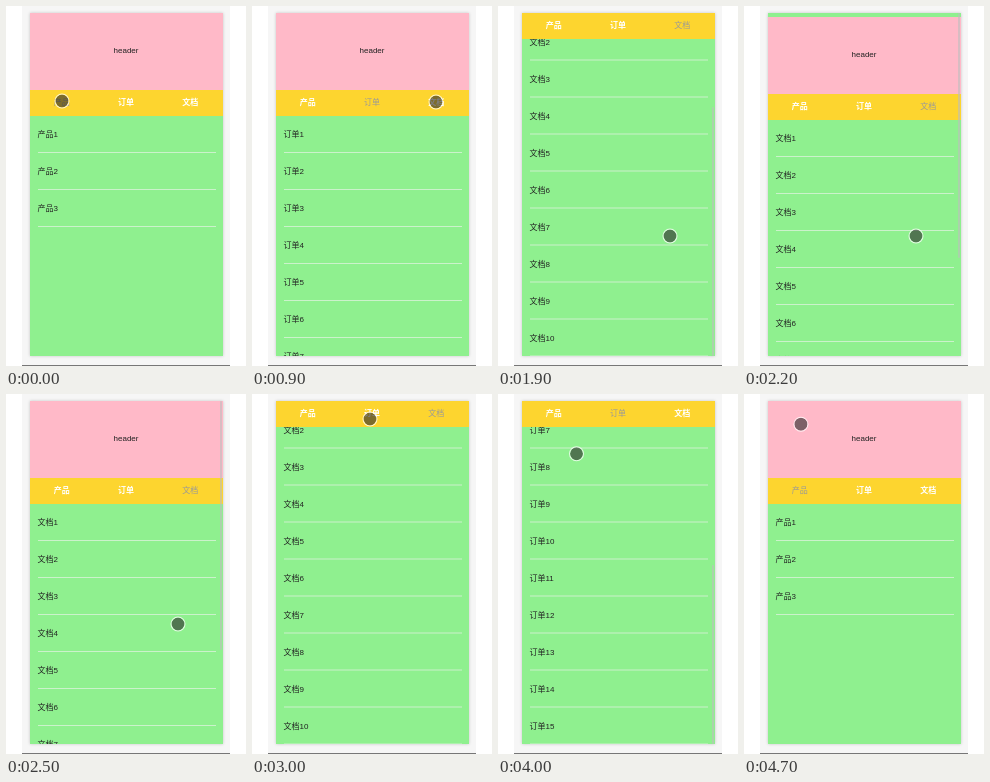
Write an HTML page that moves like this. It is 240 px wide and 360 px high and loops after 4.8 s.

```html
<!DOCTYPE html>
<html lang="zh-CN">
<head>
<meta charset="utf-8">
<style>
html, body { margin: 0; width: 100%; height: 100%; overflow: hidden; background: #fff; }
body { position: relative; font: 8px/1 "Liberation Sans", "Noto Sans CJK SC", "Noto Sans CJK", sans-serif; color: #222; }
div { position: absolute; box-sizing: border-box; }
#desk { left: 16px; top: 0; width: 208px; height: 360px; background: #f6f6f6; border-bottom: 1px solid #777; }
#phone, #shade { left: 23.5px; top: 7px; width: 193px; height: 343px; }
#phone { background: #8ff08f; overflow: hidden; }
#shade { box-shadow: 0 0 3px rgba(0,0,0,.2); }
#page, #head, #tabs { left: 0; top: 0; width: 100%; }
#head { height: 77px; line-height: 76px; background: #ffb9c8; text-align: center; }
#list { top: 102.5px; left: 8px; width: 178px; }
#list div { position: static; height: 37px; line-height: 37px; border-bottom: 1px solid #cbf2cb; }
#tabs { height: 25.5px; background: #fdd52f; display: flex; }
#tabs span { flex: 1; text-align: center; line-height: 26px; color: #fff; font-weight: 600; }
#tabs .on { color: #999; font-weight: 400; }
#bar { right: 1px; top: 0; width: 2px; border-radius: 1px; background: rgba(190,190,190,.6); }
#dot { left: 0; top: 0; width: 15px; height: 15px; border-radius: 50%; background: rgba(45,45,45,.62); background-clip: padding-box; border: 1px solid rgba(255,255,255,.75); }
</style>
</head>
<body>
<div id="desk"></div>
<div id="shade"></div>
<div id="phone">
  <div id="page"><div id="head">header</div><div id="list"></div></div>
  <div id="tabs"></div>
  <div id="bar"></div>
</div>
<div id="dot"></div>
<script>
const LOOP = 4800, STEP = 100, GLIDE = 300, PRESS = 100;
const VIEW = 343, HEAD = 77, TAB = 25.5, ROW = 37;
const names = ['产品', '订单', '文档'], counts = [3, 15, 10];
const el = id => document.getElementById(id);

// places the pointer reaches; those with a tab select it after a short press
const home = { x: 56, y: 95 };
const stops = [
  { at: 300, x: 120, y: 96, tab: 1 },
  { at: 900, x: 184, y: 96, tab: 2 },
  { at: 1500, x: 172, y: 230 },
  { at: 3000, x: 118, y: 25, tab: 1 },
  { at: 3500, x: 140, y: 159 },
  { at: 4100, x: 57, y: 25, tab: 0 },
  { at: 4950, ...home },
];

function ramp(t, from, to) {
  const p = Math.min(1, Math.max(0, (t - from) / (to - from)));
  return p * p * (3 - 2 * p);
}

function pointer(t) {
  return stops.reduce((p, s) => {
    const k = ramp(t, s.at - GLIDE, s.at);
    return { x: p.x + (s.x - p.x) * k, y: p.y + (s.y - p.y) * k };
  }, home);
}

function selected(t) {
  return stops.reduce((tab, s) => s.tab >= 0 && t >= s.at + PRESS ? s.tab : tab, 0);
}

function scroll(t, tab, max) {
  if (tab === 1) return max * ramp(t, 3600, 3900);
  if (tab === 0) return 0;
  const bounce = 4 * (ramp(t, 2100, 2200) - ramp(t, 2200, 2400));
  return max * (ramp(t, 1700, 1900) - ramp(t, 2000, 2200) + ramp(t, 2500, 2800)) - bounce;
}

el('tabs').innerHTML = names.map(n => `<span>${n}</span>`).join('');
let shown = -1;

function select(tab) {
  if (tab === shown) return;
  shown = tab;
  [...el('tabs').children].forEach((s, i) => s.classList.toggle('on', i === tab));
  el('list').innerHTML = Array.from({ length: counts[tab] },
    (_, i) => `<div>${names[tab]}${i + 1}</div>`).join('');
}

function draw(t) {
  const tab = selected(t), total = HEAD + TAB + counts[tab] * ROW;
  const y = scroll(t, tab, total - VIEW), { x: cx, y: cy } = pointer(t);
  select(tab);
  el('page').style.transform = `translateY(${-y}px)`;
  el('tabs').style.transform = `translateY(${Math.max(0, HEAD - y)}px)`;
  el('dot').style.transform = `translate(${cx - 7.5}px, ${cy - 7.5}px)`;

  const scrolling = t >= 1700 && t < 2900 || t >= 3600 && t < 4200;
  el('bar').style.opacity = scrolling ? 1 : 0;
  el('bar').style.height = VIEW * VIEW / total + Math.min(0, y) + 'px';
  el('bar').style.transform = `translateY(${Math.max(0, y) * VIEW / total}px)`;
}

const start = performance.now();
function tick() {
  const t = (performance.now() - start) % LOOP;
  draw(Math.floor(t / STEP) * STEP);
  requestAnimationFrame(tick);
}
tick();
</script>
</body>
</html>
```
